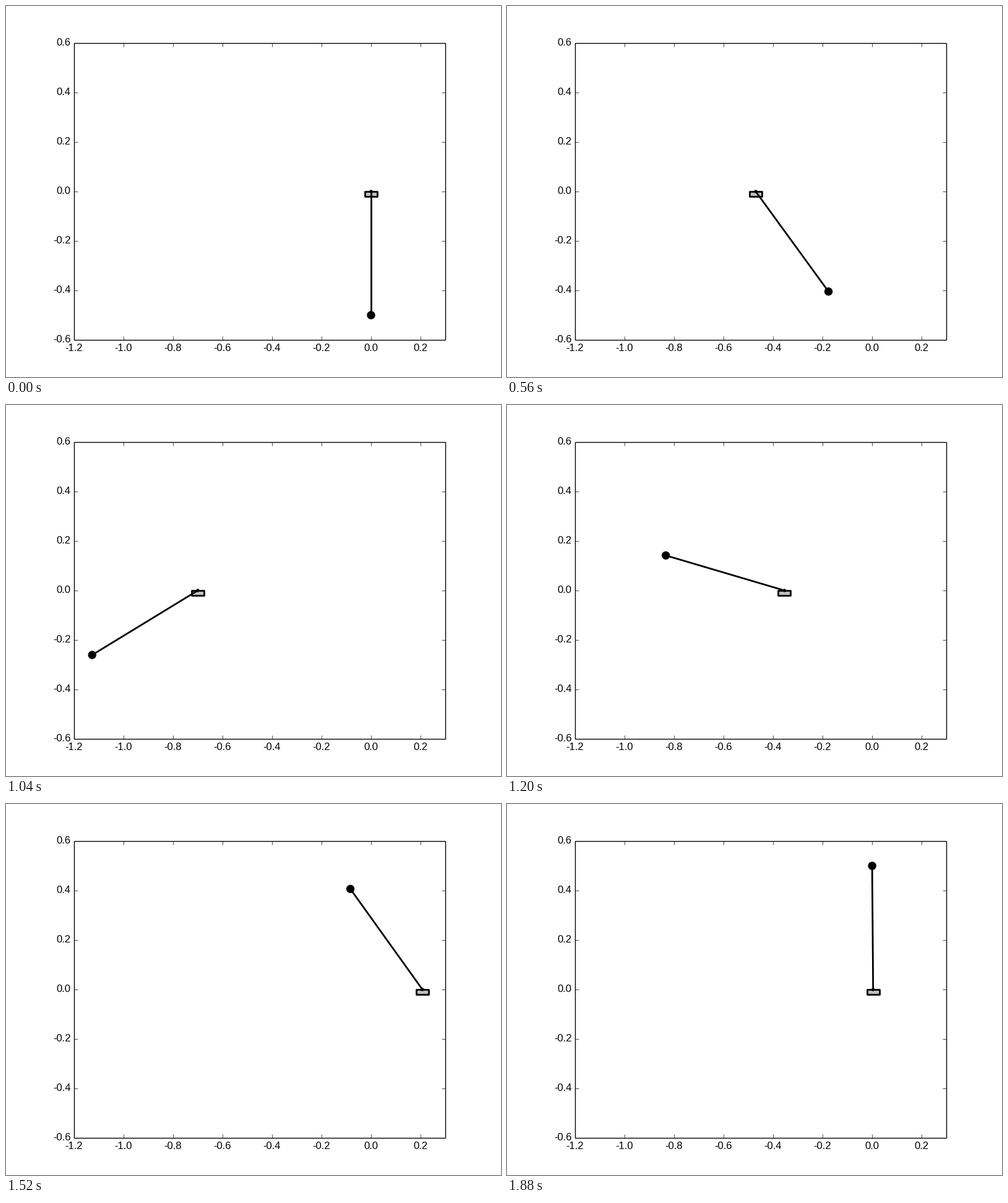
A matplotlib script that plays this animation: 800x600 px, repeating every 1.92 s.

```python
import numpy as np
import matplotlib.pyplot as plt
from matplotlib.animation import FuncAnimation
from matplotlib.patches import Circle, Rectangle
from matplotlib.ticker import MultipleLocator

plt.style.use("classic")
plt.rcParams.update({
    "font.family": "Liberation Sans",
    "font.size": 12,
    "axes.unicode_minus": False,
    "ytick.alignment": "center",
})

N_FRAMES, INTERVAL = 48, 40
LENGTH = 0.5
CART_W, CART_H = 0.05, 0.02

# Key poses of the swing-up; the pole angle is in degrees from hanging
STEPS = np.array([0, 8, 14, 19, 22, 26, 28, 34, 38, 42, N_FRAMES])
CART = [0, -0.1035, -0.47, -0.79, -0.834, -0.7, -0.546, 0.025, 0.2075, 0.121, 0]
ANGLE = [0, 10.5, 36, 30, 0, -58.6, -86, -130.1, -144.4, -164.8, -180]


def smooth_path(ts, ys):
    """Cubic spline through the key points, at rest at both ends."""
    ys = np.asarray(ys, float)
    n, h = len(ts), np.diff(ts)
    d = np.diff(ys) / h
    a, b = np.eye(n), np.zeros(n)
    for k in range(1, n - 1):
        a[k, k - 1:k + 2] = h[k], 2 * (h[k - 1] + h[k]), h[k - 1]
        b[k] = 3 * (h[k] * d[k - 1] + h[k - 1] * d[k])
    m = np.linalg.solve(a, b)

    def at(t):
        k = min(np.searchsorted(ts, t, side="right") - 1, n - 2)
        s = (t - ts[k]) / h[k]
        r = 1 - s
        return (r * r * ((1 + 2 * s) * ys[k] + s * h[k] * m[k])
                + s * s * ((1 + 2 * r) * ys[k + 1] - r * h[k] * m[k + 1]))

    return at


cart_at = smooth_path(STEPS, CART)
angle_at = smooth_path(STEPS, np.radians(ANGLE))

fig = plt.figure(figsize=(8, 6), dpi=100, facecolor="white")
ax = fig.add_subplot(111, aspect="equal")
ax.set_xlim(-1.2, 0.3)
ax.set_ylim(-0.6, 0.6)
for axis in (ax.xaxis, ax.yaxis):
    axis.set_major_locator(MultipleLocator(0.2))
for spine in ax.spines.values():
    spine.set_capstyle("butt")

cart = ax.add_patch(Rectangle((0, -CART_H), CART_W, CART_H, facecolor="0.75",
                              edgecolor="black", lw=2, joinstyle="round"))
pivot = ax.add_patch(Circle((0, 0), 0.005, color="black", lw=1, zorder=3))
bob = ax.add_patch(Circle((0, -LENGTH), 0.015, color="black", lw=1, zorder=3))
pole, = ax.plot([], [], color="black", lw=2)


def update(i):
    x, angle = cart_at(i), angle_at(i)
    tip = x + LENGTH * np.sin(angle), -LENGTH * np.cos(angle)
    cart.set_x(x - CART_W / 2)
    pivot.center = x, 0
    bob.center = tip
    pole.set_data([x, tip[0]], [0, tip[1]])
    return cart, pole, pivot, bob


anim = FuncAnimation(fig, update, frames=N_FRAMES, interval=INTERVAL,
                     repeat=True, repeat_delay=0)
plt.show()
```
